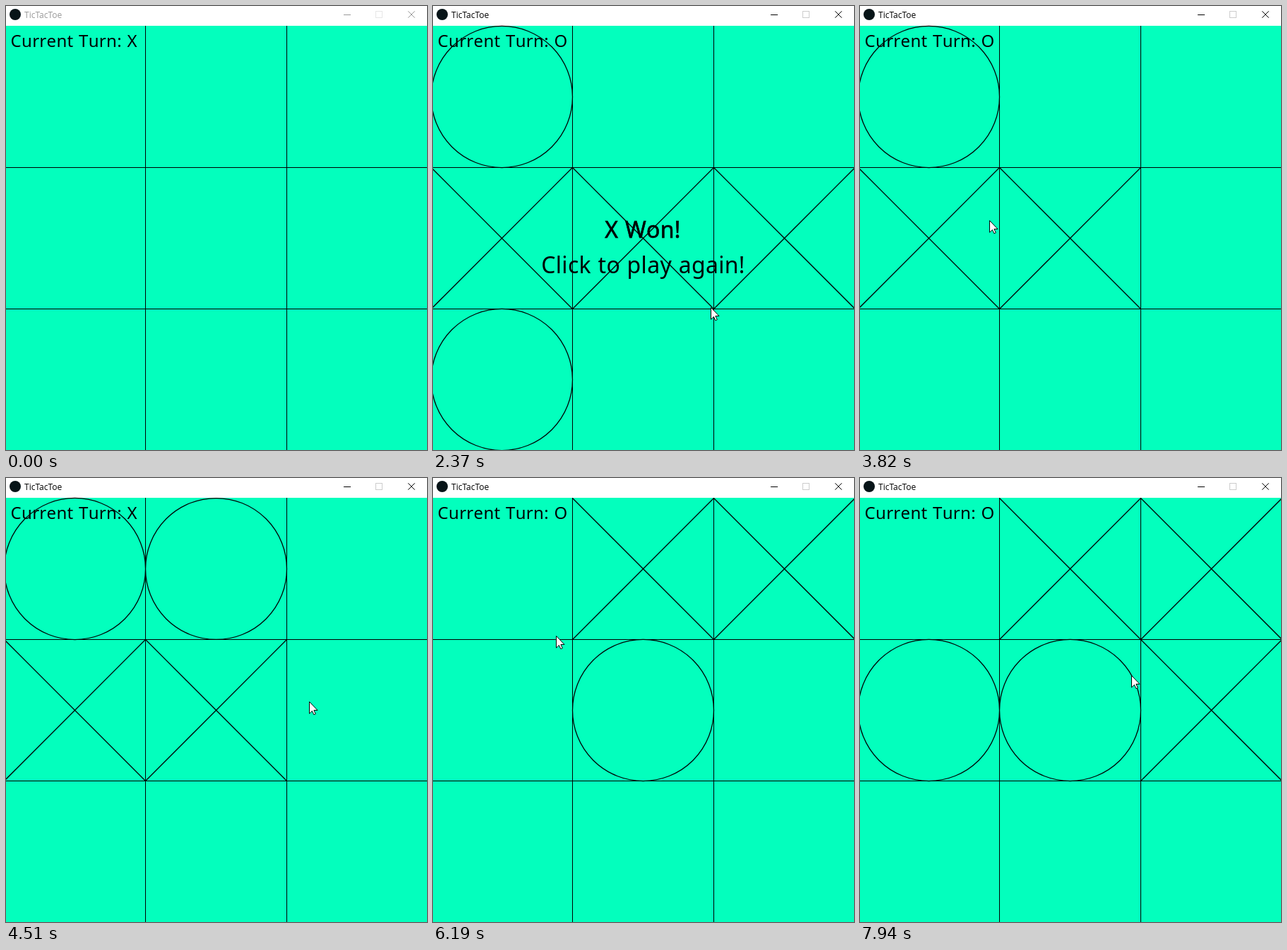
An HTML page for the animation above (8000 ms loop, 596 by 628 pixels).

```html
<!DOCTYPE html>
<html lang="en">
<head>
<meta charset="utf-8">
<title>TicTacToe</title>
<style>
  html, body { margin: 0; width: 596px; height: 628px; overflow: hidden; background: #fff; }
  svg { display: block; }
  text { font-family: "Noto Sans", "Open Sans", sans-serif; white-space: pre; }
  .game { font-kerning: none; letter-spacing: .02em; word-spacing: .056em; }
  .title { font: 12px "Open Sans", "Noto Sans", sans-serif; }
  .line { fill: none; stroke: #000; }
  .banner { font-size: 32px; text-anchor: middle; }
</style>
</head>
<body>
<svg width="596" height="628" viewBox="0 0 596 628">
  <rect width="596" height="628" fill="#fff"/>
  <circle cx="13" cy="12" r="8" fill="#071418"/>
  <text id="title" class="title" x="26" y="17">TicTacToe</text>
  <g fill="none">
    <path id="minimize" d="M478 12.5h10"/>
    <rect id="maximize" x="523.5" y="7.5" width="9" height="9"/>
    <path id="close" d="M569.3 7.3l9.4 9.4M578.7 7.3l-9.4 9.4"/>
  </g>
  <rect y="28" width="596" height="600" fill="#03ffbd"/>
  <path class="line" d="M197.5 28V628M397.5 28V628M0 228.5H596M0 428.5H596"/>
  <path id="marks" class="line" stroke-width="1.25"/>
  <g class="game">
    <text id="turn" x="6.5" y="58" font-size="24"></text>
    <g id="result">
      <text class="banner" x="297" y="328" stroke="#000" stroke-width=".6">X Won!</text>
      <text class="banner" x="297.5" y="378">Click to play again!</text>
    </g>
  </g>
  <path id="cursor" d="M.5.5V17.2L4.4 13.5 6.9 18.8 9.3 17.7 6.9 12.5H12Z" fill="#fff" stroke="#000"/>
</svg>
<script>
const LOOP = 8000, TICK = 76.4, LEAD = 8;
const SIZE = 200, LEFT = -2.5, TOP = 28.5;
const REACH = 0.7; // clicks fall short of the cell centre, towards the middle of the board

// Evenly paced clicks: cell numbers, "r" starts a new round
const clicks = [
  { start: 9, step: 5, keys: "40365r" },
  { start: 38, step: 5.5, keys: "40315r" },
  { start: 68, step: 4.5, keys: "24" },
  { start: 77, step: 12, keys: "135" }
].flatMap(({ start, step, keys }) =>
  [...keys].map((key, i) => ({ tick: start + i * step, key })));

const column = cell => cell % 3;
const row = cell => Math.floor(cell / 3);

// The pointer wanders through these places between clicks
const detours = [
  [3, 318, 585], [16, 104, 288], [22, 92, 489], [31, 393, 426], [41, 143, 324],
  [59, 429, 316], [81, 174, 223], [97, 147, 249], [104, 384, 279]
].map(([tick, x, y]) => ({ tick, x, y }));

const stops = clicks.filter(c => c.key !== "r").map(({ tick, key }) => ({
  tick,
  x: LEFT + SIZE * (1.5 + (column(key) - 1) * REACH),
  y: TOP + SIZE * (1.5 + (row(key) - 1) * REACH)
}));
const route = [...stops, ...detours].sort((a, b) => a.tick - b.tick);

// Winning lines as first cell and stride
const lines = [[0, 4], [2, 2], ...[0, 1, 2].flatMap(i => [[3 * i, 1], [i, 3]])];

const el = id => document.getElementById(id);
const paint = (id, color, attr = "stroke") => el(id).setAttribute(attr, color);

function gameAt(tick) {
  let cells = {}, turn = "X";
  for (const { key } of clicks.filter(c => c.tick <= tick)) {
    if (key === "r") {
      cells = {};
      turn = "X";
    } else {
      cells[key] = turn;
      turn = turn === "X" ? "O" : "X";
    }
  }
  const won = lines.some(([first, stride]) => cells[first] &&
    [1, 2].every(n => cells[first + n * stride] === cells[first]));
  return { cells, turn, won };
}

function pointerAt(tick) {
  const next = route.findIndex(p => p.tick >= tick);
  if (next < 1) return null;
  const a = route[next - 1], b = route[next];
  const k = (tick - a.tick) / (b.tick - a.tick);
  return [a.x + (b.x - a.x) * k, a.y + (b.y - a.y) * k].map(Math.round);
}

function markPath([cell, mark]) {
  const x = LEFT + column(cell) * SIZE, y = TOP + row(cell) * SIZE, r = SIZE / 2;
  return mark === "X"
    ? `M${x} ${y}l${SIZE} ${SIZE}M${x + SIZE} ${y}l${-SIZE} ${SIZE}`
    : `M${x} ${y + r}a${r} ${r} 0 1 1 ${SIZE} 0a${r} ${r} 0 1 1 ${-SIZE} 0`;
}

function render(time) {
  const tick = Math.floor((time % LOOP + LEAD) / TICK);
  const { cells, turn, won } = gameAt(tick);
  const focused = tick > 0;
  const ink = focused ? "#000" : "#999";

  paint("title", ink, "fill");
  paint("minimize", ink);
  paint("close", ink);
  paint("maximize", focused ? "#ccc" : "#e6e6e6");

  el("marks").setAttribute("d", Object.entries(cells).map(markPath).join(""));
  el("turn").textContent = "Current Turn: " + turn;
  el("result").style.display = won ? "" : "none";

  const pointer = pointerAt(tick);
  el("cursor").style.display = pointer ? "" : "none";
  if (pointer) el("cursor").setAttribute("transform", `translate(${pointer})`);
}

let start;
function loop(now) {
  start ??= now;
  render(now - start);
  requestAnimationFrame(loop);
}
render(0);
requestAnimationFrame(loop);
</script>
</body>
</html>
```
